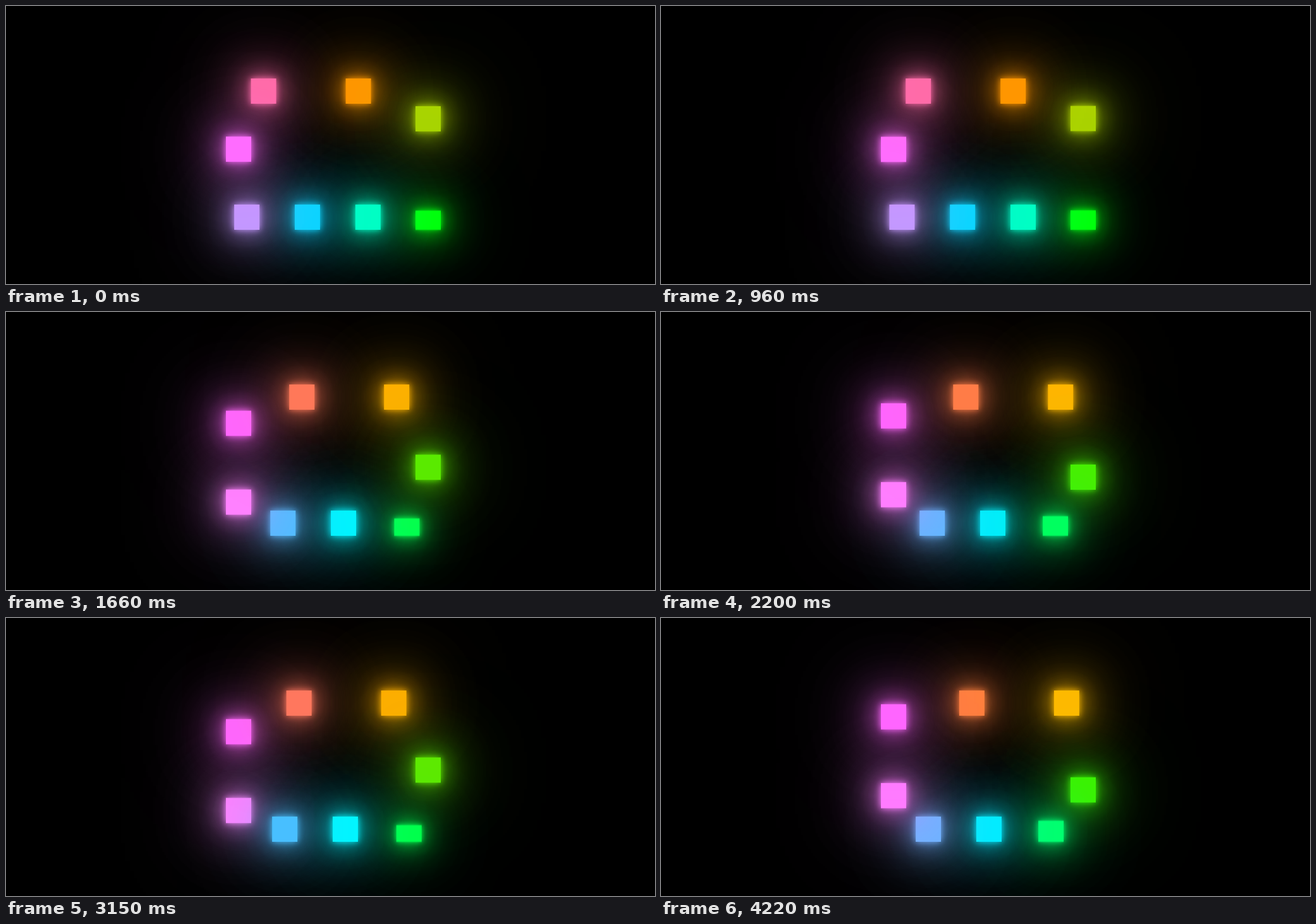
Write an HTML page that moves like this. It is 1027x441 px and loops after 4.3 s.

```html
<!DOCTYPE html>
<html lang="en">
<head>
<meta charset="utf-8">
<title>Glowing squares</title>
<style>
  html, body {
    margin: 0;
    width: 100%;
    height: 100%;
    overflow: hidden;
    background: #000;
  }
  .track {
    position: absolute;
    left: 348px;
    top: 115px;
  }
  .square {
    position: absolute;
    width: 40px;
    height: 40px;
    background: #0f0;
    box-shadow: 0 0 10px #0f0, 0 0 40px #0f0, 0 0 80px #0f0,
                0 0 120px #0f0, 0 0 160px #0f0;
    transform-origin: bottom;
  }
</style>
</head>
<body>
<div class="track"></div>
<script>
  const LOOP = 4300;
  const COUNT = 8;

  // The picture moves in ticks, beginning partway through the first one
  const TICK = 77.3;
  const LEAD = 45;
  const FIRST = 0.22;
  const LAST = 55;

  // Distance is measured in gaps between neighbouring squares
  const START = 0.229;
  const STEP = 0.1563;

  const at = (x, y, scale = 1) => `translate(${x}px, ${y}px) scaleY(${scale})`;

  const lap = [
    { offset: 0, transform: at(0, 0), filter: 'hue-rotate(-144deg)' },
    { offset: 0.25, transform: at(300, 0) },
    { offset: 0.4, transform: at(300, 200) },
    { offset: 0.42, transform: at(300, 200, 0.4) },
    { offset: 0.5, transform: at(230, 200) },
    { offset: 0.8, transform: at(0, 200) },
    { offset: 1, transform: at(0, 0), filter: 'hue-rotate(216deg)' }
  ];

  const track = document.querySelector('.track');

  const runs = Array.from({ length: COUNT }, () => {
    const square = document.createElement('div');
    square.className = 'square';
    track.append(square);
    const run = square.animate(lap, { duration: COUNT, iterations: Infinity });
    run.pause();
    return run;
  });

  function draw() {
    const time = performance.now() % LOOP;
    const tick = Math.floor((time + LEAD) / TICK);
    const distance = START + STEP * Math.min(LAST, Math.max(FIRST, tick));
    runs.forEach((run, i) => {
      run.currentTime = (distance + i) % COUNT;
    });
    requestAnimationFrame(draw);
  }
  draw();
</script>
</body>
</html>
```
